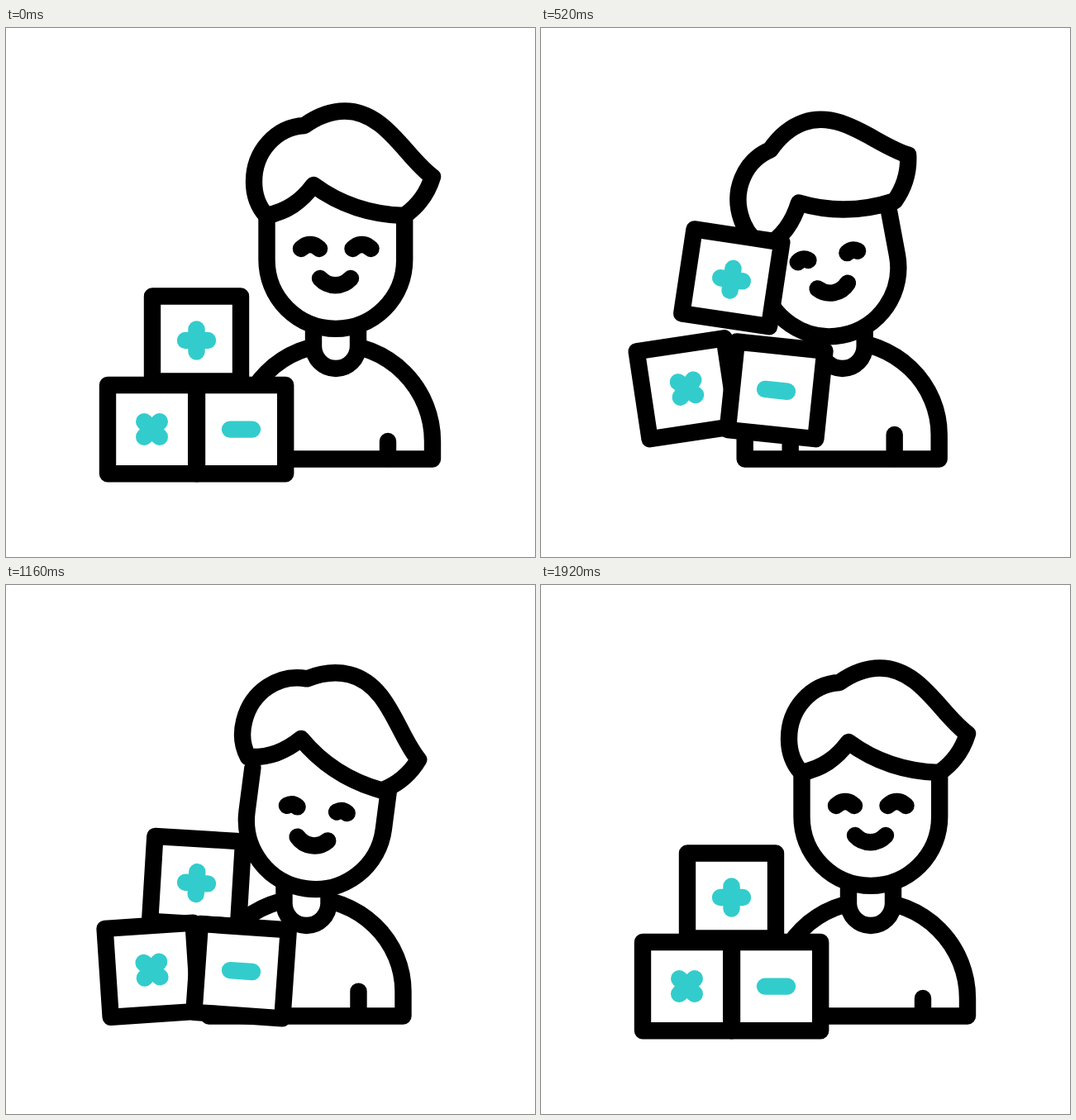
These frames come from a looping animation (640 by 640 pixels, 3600 ms). An HTML page:

```html
<!DOCTYPE html>
<html lang="en">
<head>
<meta charset="utf-8">
<title>Learning blocks</title>
<style>
  html, body { margin: 0; width: 100%; height: 100%; overflow: hidden; background: #fff; }
  svg { display: block; width: 100%; height: 100%; }
  .ink { fill: #fff; stroke: #000; stroke-width: 20.4; stroke-linecap: round; stroke-linejoin: round; }
  .line { fill: none; }
  .sign { fill: none; stroke: #3cc; stroke-width: 20.4; stroke-linecap: round; }
</style>
</head>
<body>
<svg viewBox="0 0 640 640">
  <g class="ink">
    <g id="body">
      <path id="torso"/>
      <path class="line" id="arms"/>
      <path d="M372 355V385A27 27 0 0 0 426 385V355"/>
    </g>
    <g id="head">
      <path d="M315.5 227V280.5A83.3 83.3 0 0 0 482.2 280.5V227"/>
      <path class="line" id="eyes"/>
      <path class="line" d="M380 303C390 314 407 314 417 303"/>
      <path id="hair" d="M315 227C305 216 300 202 300 186C300 149 327 120 361 118C375 108 391 100.5 410 100.5C459 100.5 484 157 516 180C510 200 499 215 482 227C443 226 406 215 372 190C357 210 340 222 315 227Z"/>
    </g>
  </g>
  <g id="top">
    <rect class="ink" x="177" y="324.5" width="107" height="103"/>
    <path class="sign" d="M217 378H244M230.5 364.5V391.5"/>
  </g>
  <g id="left">
    <rect class="ink" x="123" y="432" width="107.2" height="107.2"/>
    <path class="sign" d="M167.2 476.2L185.8 494.8M185.8 476.2L167.2 494.8"/>
  </g>
  <g id="right">
    <rect class="ink" x="231" y="432" width="107.2" height="107.2"/>
    <path class="sign" d="M271 485.6H298"/>
  </g>
</svg>
<script>
const LOOP = 3600;
const el = id => document.getElementById(id);

// Eased step from 0 to 1 between two times
function ease(t, from, to) {
  const s = Math.min(1, Math.max(0, (t - from) / (to - from)));
  return s * s * (3 - 2 * s);
}

// Sine hop between two times, 0 outside; a higher power is narrower
const hop = (t, from, to, power = 1) =>
  t <= from || t >= to ? 0 : Math.sin(Math.PI * (t - from) / (to - from)) ** power;

function place(id, x, y, angle = 0, cx = 0, cy = 0) {
  el(id).setAttribute("transform", `translate(${x} ${y}) rotate(${angle} ${cx} ${cy})`);
}

const setPath = (id, d) => el(id).setAttribute("d", d);

function drawBody(lean) {
  const y = 500 - 9 * lean, ry = 117.5 - 5 * lean;
  place("body", -38 * lean, 0);
  setPath("torso", `M281 521.5V${y}A117.5 ${ry} 0 0 1 516 ${y}V521.5Z`);
  setPath("arms", `M336 521V${y}M462 521V${y}`);
}

function drawHead(t, lean) {
  const nod = 8 * hop(t, 60, 1000) + 7 * hop(t, 1040, 1760);
  const tilt = -12 * ease(t, 80, 640) + 20.5 * ease(t, 730, 1100)
    - 15 * ease(t, 1100, 1460) + 6.5 * ease(t, 1460, 1900);
  const sway = -13 * ease(t, 220, 690) + 20 * ease(t, 800, 1120)
    - 9.5 * ease(t, 1120, 1500) + 2.5 * ease(t, 1500, 1900);
  place("head", -38 * lean, nod, tilt, 398.5, 365);
  place("hair", 0, 0, sway, 416, 163);

  // Eyes narrow and flatten as the body leans
  const half = 11 - 5 * lean, rise = 10 - 6 * lean;
  const eye = x => `M${x - half} 267q${half} ${-rise} ${2 * half} 0`;
  setPath("eyes", eye(368 + lean) + eye(430.5 - lean));
}

function drawBlocks(t) {
  place("top", 0, -75 * hop(t, 0, 1180) - 18.5 * hop(t, 1020, 1560),
    8.8 * hop(t, 0, 1160, 2.4) + 8 * hop(t, 1080, 1640), 230.5, 378);
  place("left", 0, -50 * hop(t, 93, 1047) - 23.5 * hop(t, 1047, 1400),
    -8.9 * hop(t, 93, 1047, 3) - 4.5 * hop(t, 1047, 1400), 176.5, 485.5);
  place("right", 0, -51 * hop(t, 0, 835) - 18.5 * hop(t, 835, 1480),
    6.4 * hop(t, 0, 835) + 4 * hop(t, 835, 1480), 284.5, 485.5);
}

function draw(t) {
  const lean = ease(t, 100, 620) - ease(t, 1064, 1681);
  drawBody(lean);
  drawHead(t, lean);
  drawBlocks(t);
}

let start;
function tick(now) {
  if (start === undefined) start = now;
  draw(Math.max(0, now - start) % LOOP);
  requestAnimationFrame(tick);
}
draw(0);
requestAnimationFrame(tick);
</script>
</body>
</html>
```
